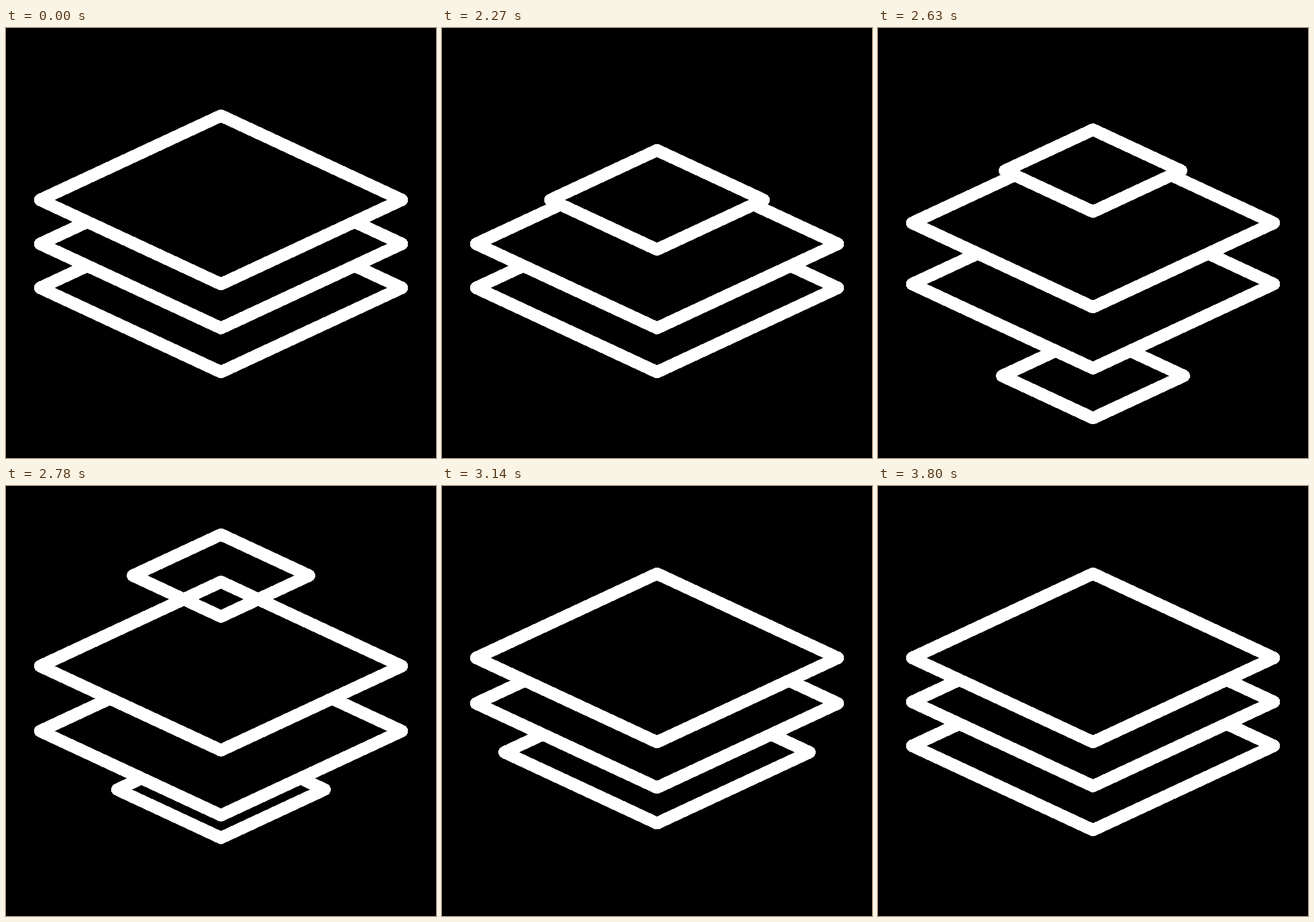
These frames come from a looping animation (748x748 px, 3830 ms). An HTML page:

```html
<!DOCTYPE html>
<html>
<head>
<meta charset="utf-8">
<style>
  html, body { margin: 0; width: 100%; height: 100%; overflow: hidden; background: #000; }
  svg { display: block; width: 100%; height: 100%; }
  path { fill: #000; stroke: #fff; stroke-width: 21.6; stroke-linejoin: round; shape-rendering: crispEdges; }
</style>
</head>
<body>
<svg viewBox="0 0 748 748">
  <path id="entering"/>
  <path id="lower"/>
  <path id="middle"/>
  <path id="leaving"/>
</svg>
<script>
  const LOOP = 3830, STEP = 30, SMALL = 0.487;
  const TOP = 299, GAP = 76.5;
  const [entering, lower, middle, leaving] = document.querySelectorAll('path');

  // Eased 0..1 progress along cubic-bezier(x1, 0, x2, 1)
  function ease(time, start, duration, x1, x2) {
    const x = (time - start) / duration;
    if (x <= 0) return 0;
    if (x >= 1) return 1;
    let lo = 0, hi = 1;
    for (let i = 0; i < 30; i++) {
      const u = (lo + hi) / 2, v = 1 - u;
      if (3 * v * v * u * x1 + 3 * v * u * u * x2 + u * u * u < x) lo = u;
      else hi = u;
    }
    return lo * lo * (3 - 2 * lo);
  }

  function place(layer, y, scale = 1) {
    const w = 314.6 * scale, h = 146.5 * scale;
    layer.setAttribute('d', `M${374 - w} ${y}L374 ${y - h}L${374 + w} ${y}L374 ${y + h}Z`);
  }

  const show = (layer, on) => layer.style.display = on ? '' : 'none';

  function draw(t) {
    // The top layer shrinks, then lifts off and vanishes
    const shrink = ease(t, 2010, 460, .33, .33);
    const lift = ease(t, 2497, 490, .33, .33);
    place(leaving, TOP - 176 * lift, 1 - (1 - SMALL) * shrink);
    leaving.style.fill = t < 2650 ? '#000' : 'none';
    show(leaving, t < 2880);

    // The others move up one place
    place(middle, TOP + GAP * (1 - ease(t, 2300, 680, .4, .6)));
    place(lower, TOP + GAP * (2 - ease(t, 2500, 720, .333, .667)));

    // A new layer rises from below and grows
    const rise = ease(t, 2510, 971, .236, .077);
    const grow = ease(t, 2510, 1320, .325, .32);
    place(entering, TOP + 2 * GAP + 180 * (1 - rise), SMALL + (1 - SMALL) * grow);
    show(entering, t >= 2555);
  }

  const origin = performance.now();
  function tick() {
    const t = (performance.now() - origin) % LOOP;
    draw(2000 + Math.floor((t - 2000) / STEP) * STEP);
    requestAnimationFrame(tick);
  }
  tick();
</script>
</body>
</html>
```
